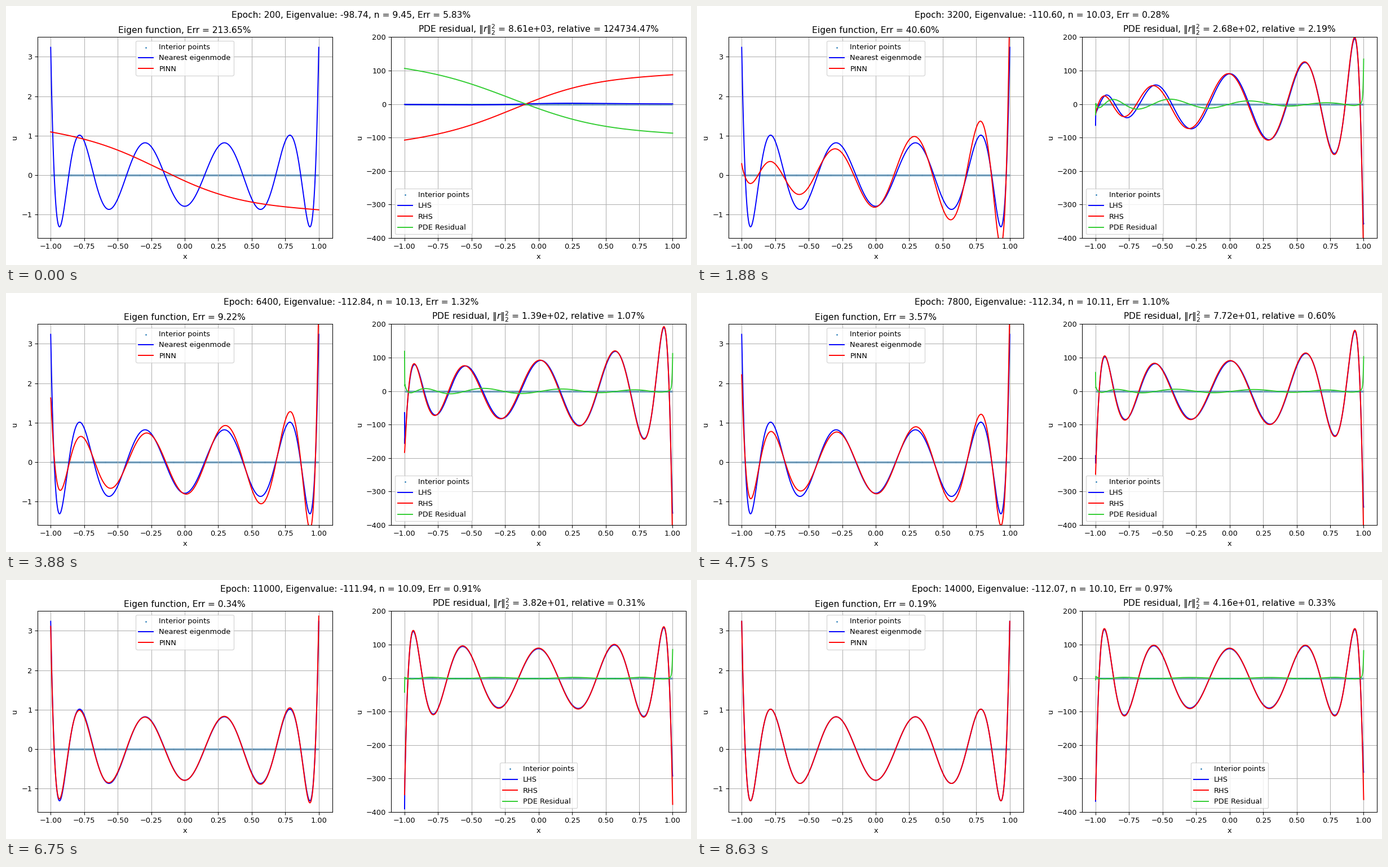
A matplotlib script for the animation above (8.76 s loop, 1215 by 461 pixels).

```python
import numpy as np
import matplotlib.pyplot as plt
from matplotlib.animation import FuncAnimation

WIDTH, HEIGHT, DPI = 1215, 461, 92.8
FRAMES, FRAME_MS = 73, 120
STEPS, STEP_MS, EPOCH_STEP = 70, 125, 200
DEGREE = 10

x = np.linspace(-1, 1, 2001)
theta = np.arccos(x)

# Training progress at a few epochs; everything between is interpolated
EPOCHS = [200, 1800, 4800, 6400, 9000, 11000, 14000]
EIGENVALUE = [-98.74, -106.13, -115.70, -112.836, -111.92, -111.94, -112.07]
TILT = [.65, .65, .63, .40, .17, .04, 0]
MODE_ERROR = np.log([213.65, 50.91, 31.34, 9.22, 1.58, .34, .19])
RES_NORM = np.log([8610, 338, 205, 139, 46.6, 38.2, 41.6])
RES_RELATIVE = np.log([124734.47, 3.07, 1.49, 1.07, .37, .31, .33])


def eigenmode(w):
    """Normalised Legendre polynomial."""
    coef = [0] * DEGREE + [1]
    return np.sqrt(DEGREE + .5) * np.polynomial.legendre.legval(w, coef)


def legendre_operator(u):
    """((1 - x^2) u')' on the grid."""
    flux = (1 - x**2) * np.gradient(u, x, edge_order=2)
    return np.gradient(flux, x, edge_order=2)


def first_guess():
    d = x + .17
    return .12 - np.tanh(1.65 * d) - .03 * d**3 + .11 * np.minimum(d, 0)**2


def learned_mode(n, tilt):
    """Eigenmode shifted in phase by the degree error and weaker on the left."""
    shift = .125 * (10.1 - n)
    gain = 1 + .06 * tilt + tilt * x - .75 * (tilt * x)**2
    return gain * eigenmode(np.cos(theta * (1 - shift)))


# Layout in pixels, following the default subplot margins of a 16 x 5 inch page
PAGE_W, PAGE_H = 16 * DPI, 5 * DPI
AX_W = .775 * PAGE_W / 2.2
AX_LEFT, AX_BOTTOM = 55.5, 412.7

fig = plt.figure(figsize=((WIDTH + 1e-6) / DPI, (HEIGHT + 1e-6) / DPI), dpi=DPI)
heading = fig.suptitle("", x=611.8 / WIDTH, y=1 - .02 * PAGE_H / HEIGHT,
                       va="top", fontsize=12)


def panel(left, ylim, curves, loc):
    ax = fig.add_axes([left / WIDTH, 1 - AX_BOTTOM / HEIGHT,
                       AX_W / WIDTH, .77 * PAGE_H / HEIGHT])
    pts = np.linspace(-1, 1, 500)
    ax.scatter(pts, 0 * pts, s=1, label="Interior points")
    lines = [ax.plot(x, 0 * x, color=c, label=name)[0] for name, c in curves]
    ax.set(xlim=(-1.1, 1.1), ylim=ylim, xlabel="x", ylabel="u")
    ax.grid(True)
    ax.legend(loc=loc)
    return ax, lines


ax_u, (mode_line, pinn_line) = panel(
    AX_LEFT, (-1.6, 3.5),
    [("Nearest eigenmode", "blue"), ("PINN", "red")], "upper center")
ax_r, (lhs_line, rhs_line, res_line) = panel(
    AX_LEFT + 1.2 * AX_W, (-400, 200),
    [("LHS", "blue"), ("RHS", "red"), ("PDE Residual", "limegreen")], "best")
mode_line.set_ydata(eigenmode(x))


def update(frame):
    # show the last training step that starts within this frame
    step = min(((frame + 1) * FRAME_MS - 1) // STEP_MS, STEPS - 1)
    epoch = EPOCH_STEP * (step + 1)

    def at(values):
        return np.interp(epoch, EPOCHS, values)

    lam, tilt = at(EIGENVALUE), at(TILT)
    n = np.sqrt(.25 - lam) - .5

    # the oscillation replaces the first guess over the opening steps
    p = min(1, step / 8)
    mix = p * p * (3 - 2 * p)
    u = (1 - mix) * first_guess() + mix * learned_mode(n, tilt)

    # the fit stays poor right at the right end
    edge = mix * 75 * (1 + tilt) * np.exp((x - 1) / .004)
    rhs = lam * u
    lhs = legendre_operator(u) + edge

    pinn_line.set_ydata(u)
    lhs_line.set_ydata(lhs)
    rhs_line.set_ydata(rhs)
    res_line.set_ydata(lhs - rhs)

    heading.set_text(f"Epoch: {epoch}, Eigenvalue: {lam:.2f}, n = {n:.2f}, "
                     f"Err = {100 * abs(DEGREE - n) / n:.2f}%")
    ax_u.set_title(f"Eigen function, Err = {np.exp(at(MODE_ERROR)):.2f}%")
    ax_r.set_title(rf"PDE residual, $\|r\|_2^2$ = {np.exp(at(RES_NORM)):.2e}, "
                   f"relative = {np.exp(at(RES_RELATIVE)):.2f}%")
    return pinn_line, lhs_line, rhs_line, res_line


anim = FuncAnimation(fig, update, frames=FRAMES, interval=FRAME_MS,
                     repeat=True, repeat_delay=0, blit=False)
plt.show()
```
